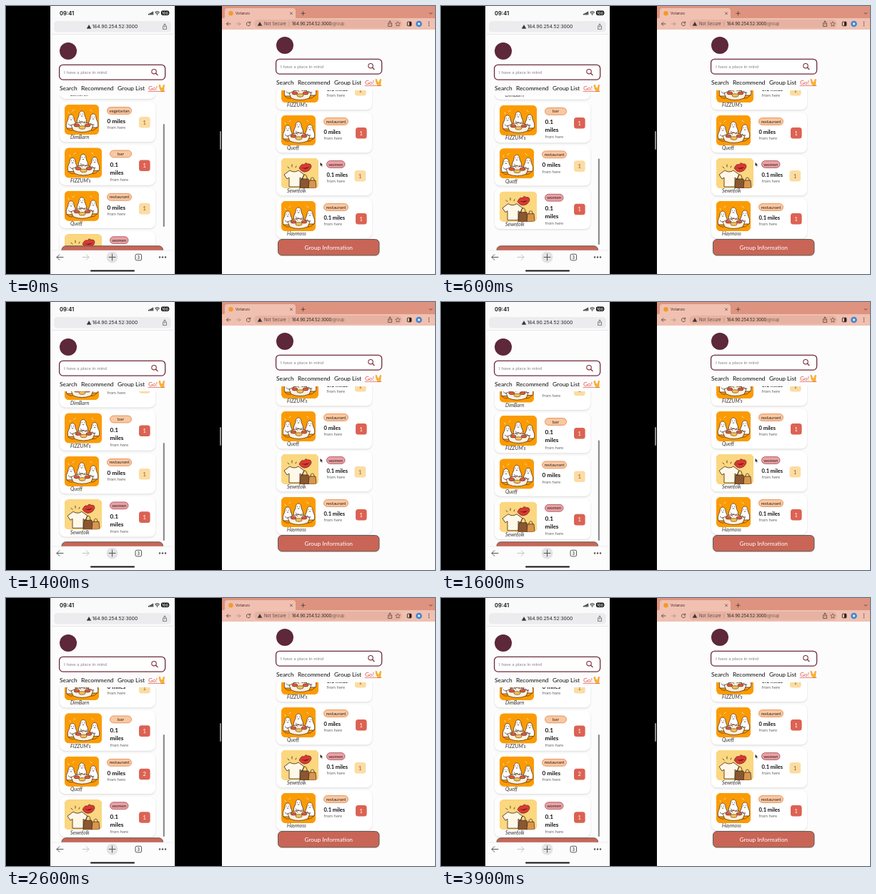
Recreate the animation shown at these times as an HTML page. Size 600 px wide and 375 px high, loop 4000 ms.

```html
<!DOCTYPE html>
<html lang="en">
<head>
<meta charset="utf-8">
<title>Group list</title>
<style>
  html, body { margin: 0; width: 100%; height: 100%; overflow: hidden; background: #000; }
  svg { display: block; }
  text { font-family: Lato, sans-serif; }
  .ui { font-family: Inter, sans-serif; }
  .line { fill: none; stroke-linecap: round; stroke-linejoin: round; }
  .card { filter: drop-shadow(0 1px 1px rgba(0, 0, 0, .14)); }
</style>
</head>
<body>
<svg id="stage" width="600" height="375" viewBox="0 0 600 375">
  <defs>
    <clipPath id="phoneList"><rect x="62" y="125" width="174" height="217"/></clipPath>
    <clipPath id="webList"><rect x="370" y="118" width="170" height="212"/></clipPath>
    <clipPath id="round48"><rect width="48" height="42" rx="6"/></clipPath>
    <clipPath id="round52"><rect width="52" height="42" rx="6"/></clipPath>

    <g id="friend" stroke="#3b1d10" stroke-width=".7">
      <path d="M-6 14C-8 7-5 5-4 1C-4-7 4-7 4 1C5 5 8 7 6 14Z" fill="#fff"/>
      <path class="line" d="M-1.6-1v.4M1.6-1v.4M-1 2q1 1 2 0M-4 8q2 3 5 2"/>
    </g>
    <g id="dinner">
      <rect width="54" height="42" fill="#fb9b04"/>
      <use href="#friend" x="24" y="14"/>
      <use href="#friend" x="9" y="19"/>
      <use href="#friend" x="40" y="18"/>
      <path d="M9 29q15-9 31 0l-3 7q-13 5-25 0Z" fill="#fff2df" stroke="#3b1d10" stroke-width=".7"/>
      <g stroke="#3b1d10" stroke-width=".6">
        <ellipse cx="17" cy="29" rx="4" ry="2" fill="#e8593c"/>
        <ellipse cx="32" cy="29" rx="4" ry="2" fill="#e8593c"/>
        <ellipse cx="24.500" cy="32" rx="4.500" ry="2.200" fill="#ffc34d"/>
        <path class="line" d="M3 33q3 4 8 3M37 36q5 1 8-4M20 24l3 3M29 23l-2 3"/>
      </g>
      <path class="line" d="M11 9l2-2M36 7l2 2M6 12l-1-2" stroke="#fff" stroke-width=".7"/>
    </g>
    <g id="shopping">
      <rect width="54" height="42" fill="#fbd780"/>
      <path d="M12 17l-8 6 4 6 3-2v13h15V27l3 2 3-6-8-6q-6 4-12 0Z" fill="#fff8e9" stroke="#3b2415" stroke-width=".8"/>
      <path d="M25 14q3-7 7-5q2-4 5-1q5-1 5 4q-2 6-8 7q-5 1-9-5Z" fill="#d93a33" stroke="#5b1c18" stroke-width=".6"/>
      <path d="M28 13q5 2 11-1q-4 5-11 1Z" fill="#42130f"/>
      <path d="M27 29h11l1 13H26Z" fill="#8a5731" stroke="#3b2415" stroke-width=".7"/>
      <path d="M39 31h9l1 11H38Z" fill="#d9964d" stroke="#3b2415" stroke-width=".7"/>
      <path class="line" d="M30 29q0-6 3-6t3 6M41 31q0-4 2.500-4t2.500 4M9 12l2 2M15 9v3M21 11l-1 2" stroke="#3b2415" stroke-width=".8"/>
    </g>
  </defs>
</svg>
<script>
const stage = document.getElementById('stage');

const text = (x, y, size, str, fill = '#111', extra = '') =>
  `<text x="${x}" y="${y + size * .35}" font-size="${size}" fill="${fill}" ${extra}>${str}</text>`;
const rect = (x, y, w, h, fill, rx = 0, extra = '') =>
  `<rect x="${x}" y="${y}" width="${w}" height="${h}" rx="${rx}" fill="${fill}" ${extra}/>`;
const circle = (x, y, r, fill, extra = '') =>
  `<circle cx="${x}" cy="${y}" r="${r}" fill="${fill}" ${extra}/>`;
const line = (d, color, width = 1) =>
  `<path class="line" d="${d}" stroke="${color}" stroke-width="${width}"/>`;
const group = (x, y, body, extra = '') =>
  `<g transform="translate(${x} ${y})" ${extra}>${body}</g>`;
const middle = 'text-anchor="middle"';
const ui = 'class="ui"';
const bold = 'font-weight="700"';

const warning = (x, y) =>
  `<path d="M${x} ${y - 2.5}l2.900 5h-5.800Z" fill="#333" stroke="#333" stroke-width=".4" stroke-linejoin="round"/>`;
const share = (x, y, color) =>
  line(`M${x - 1.2} ${y - 1}h-1.300v4.500h5v-4.500h-1.300M${x} ${y + 1}v-5m-1.400 1.400l1.400-1.400l1.400 1.400`, color, .7);

const victory = group(214, 110,
  `<g fill="#fdb72b" stroke="#e8901c" stroke-width=".4">
    <rect x="1" y="0" width="2" height="6.500" rx="1" transform="rotate(-14 2 6)"/>
    <rect x="4.500" y="0" width="2" height="6.500" rx="1" transform="rotate(16 5 6)"/>
    <path d="M1.500 5.500q3-2 5.500 0q1 4-2 4.500q-3 0-3.500-4.500Z"/>
  </g>`);

const header = circle(87, 63, 12, '#5d2839') +
  rect(74.6, 82.3, 148, 20.8, '#fff', 5, 'stroke="#6d2b3b" stroke-width="1.300"') +
  text(81, 93, 6.4, 'I have a place in mind', '#85808a') +
  circle(207, 91.7, 3.2, 'none', 'stroke="#7c2c3c" stroke-width="1.100"') +
  line('M209.500 94.200l2.600 2.500', '#7c2c3c', 1.2) +
  [[75, 'Search'], [105, 'Recommend'], [156, 'Group List']]
    .map(([x, s]) => text(x, 115, 8.35, s, '#0c0c0c')).join('') +
  text(199, 115, 8.35, 'Go!', '#dd5547') +
  victory + line('M199 119.500H222', '#dd5547', .7);

const tags = {
  plain: ['#f8c8a2', '#e78c50'],
  women: ['#e8a2a6', '#b4535d']
};

function badge(x, n, hot, id = '') {
  return `<g id="${id}">` + rect(x, 17, 15.6, 15.6, hot ? '#dc6253' : '#fcdca2', 3.5) +
    text(x + 7.8, 25, 7.5, n, hot ? '#fff' : '#85602c', middle) + '</g>';
}

// Coordinates inside a card start at the top left of its picture.
function card(x, y, o) {
  const wide = o.tag === 'bar' || o.tag === 'women';
  const left = wide ? 63.5 : 59.5;
  const tagW = o.tag === 'women' ? 25.5 : wide ? 30 : 34;
  const [fill, stroke] = tags[o.tag] || tags.plain;
  const w = wide ? 52 : 48;
  const art = o.tag === 'women' ? 'shopping' : 'dinner';
  const shift = wide && art === 'dinner' ? 2 : 0;
  const size = o.web ? 7.5 : 8.2;
  const dist = o.wrap
    ? text(left, 23.5, size, '0.1', '#111', bold) + text(left, 34.5, size, 'miles', '#111', bold)
    : text(left, 23, size, o.miles + ' miles', '#111', bold);
  return group(x, y,
    rect(-7, -4, 134, 56.3, '#fff', 8, 'class="card"') +
    `<g clip-path="url(#round${w})"><rect width="54" height="42" fill="#fb9b04"/><use href="#${art}" x="${shift}"/></g>` +
    text(8, 46, 7.1, o.name, '#333', 'font-style="italic"') +
    rect(left, 3.6, tagW, 9.8, fill, 4.9, `stroke="${stroke}" stroke-width=".9"`) +
    text(left + tagW / 2, 8.4, 6.2, o.tag, '#2d1d18', middle) +
    dist +
    text(left, o.wrap ? 44.5 : 32.3, 6, 'from here', '#666') +
    badge(o.badgeX || 104, 1, o.hot, o.id) );
}

const button = (x, y) =>
  rect(x, y, 141.5, 22.5, '#c86556', 5.5, 'stroke="#5f5c55" stroke-width="1"') +
  text(x + 70.7, y + 11.5, 8.3, 'Group Information', '#fff', middle);

const PITCH = 60.4;
const phoneCards = [
  { name: 'Lumbrell', tag: 'restaurant', miles: '0' },
  { name: 'DimBarn', tag: 'vegetarian', miles: '0' },
  { name: "FIZZUM's", tag: 'bar', wrap: true, hot: true },
  { name: 'Quoff', tag: 'restaurant', miles: '0', id: 'votes' },
  { name: 'Sewnfolk', tag: 'women', wrap: true, hot: true }
];
const webCards = [
  { name: "FIZZUM's", tag: 'bar', miles: '0.1', badgeX: 103 },
  { name: 'Quoff', tag: 'restaurant', miles: '0', hot: true },
  { name: 'Sewnfolk', tag: 'women', miles: '0.1', badgeX: 102.5 },
  { name: 'Haymoss', tag: 'restaurant', miles: '0.1', hot: true }
];

const phone = rect(62, 0, 174, 375, '#fdfcfd') +
  rect(62, 0, 174, 39.5, '#fafafb') +
  text(75, 10, 7.6, '09:41', '#111', ui + ' font-weight="600"') +
  [0, 1, 2, 3].map(i => rect(199 + i * 1.9, 10.8 - i, 1.3, 1.6 + i, '#111', .3)).join('') +
  line('M208.500 8.800q3-2.600 6 0M209.800 10.400q1.700-1.400 3.400 0', '#111', 1) +
  circle(211.5, 12, .7, '#111') +
  rect(217, 6.5, 11, 6.4, '#111', 1.8) + rect(228.4, 8.6, .8, 2.2, '#777', .4) +
  text(222.5, 9.8, 5, '100', '#fff', ui + ' font-weight="600" ' + middle) +
  rect(67, 21, 164, 15.6, '#ececef', 5) +
  warning(116, 29) + text(120.5, 29, 6.7, '164.90.254.52:3000', '#222', ui) +
  share(222, 29, '#555') +
  line('M62 39.500H236', '#dddddf', .6) +
  header +
  `<g clip-path="url(#phoneList)"><g id="list">` +
  phoneCards.map((o, i) => card(82, (i - 1) * PITCH, o)).join('') + '</g>' +
  button(78, 335.8) + '</g>' +
  '<rect id="thumb" x="219.800" width="2" rx="1" fill="#828284"/>' +
  rect(62, 342, 174, 33, '#fcfcfc') + line('M62 342H236', '#dcdcde', .5) +
  line('M80 351.500H71m3.800-3.800l-3.800 3.800l3.800 3.800', '#555', 1) +
  line('M107 351.500h9m-3.800-3.800l3.800 3.800l-3.800 3.800', '#c4c4c6', 1) +
  circle(148.5, 351.5, 8, '#e3e3e7') + line('M144 351.500h9M148.500 347v9', '#555', 1) +
  rect(181, 347.3, 8.6, 8.6, 'none', 1.8, 'stroke="#555" stroke-width="1"') +
  text(185.3, 351.7, 5.5, '3', '#444', ui + ' font-weight="600" ' + middle) +
  [215, 219, 223].map(x => circle(x, 351.5, 1.2, '#555')).join('') +
  rect(118, 369.4, 62, 2, '#111', 1);

const browser = rect(302, 0, 298, 375, '#fdfcfd') +
  rect(302, 0, 298, 18, '#dd937f') +
  '<path d="M303 18q3 0 3-3V7q0-4 4-4h91q4 0 4 4v8q0 3 3 3Z" fill="#f0c0b1"/>' +
  rect(302, 17, 298, 16, '#f0c0b1') +
  circle(314.5, 10.3, 3.2, '#f39a2b') +
  text(321, 10.3, 5.2, 'Votanzo', '#3a2a26', ui) +
  line('M397.500 8.800l3 3m0-3l-3 3', '#4a3833', .7) +
  line('M413 10.300h5M415.500 7.800v5', '#4a3833', .8) +
  line('M592 9.300l2 2l2-2', '#4a3833', .8) +
  line('M314 25h-5.500m2.400-2.400l-2.400 2.400l2.400 2.400', '#4a3833', .8) +
  line('M322.500 25h5.500m-2.400-2.400l2.400 2.400l-2.400 2.400', '#b08b80', .8) +
  line('M341.500 23.700a2.700 2.700 0 1 0 .2 2.200M341.700 22v1.900h-1.900', '#4a3833', .8) +
  rect(347, 19, 207, 12, '#e7b2a2', 6) +
  warning(355, 25) + text(361, 25, 5.8, 'Not Secure', '#5d4640', ui) +
  line('M396 22v6', '#b58b7f', .6) +
  text(400, 25, 5.8, '164.90.254.52:3000<tspan fill="#765b53">/group</tspan>', '#241a17', ui) +
  share(537, 25, '#4a3833') +
  '<path d="M548 21.800l1 2.100 2.300.300-1.700 1.600.4 2.300-2-1.100-2 1.100.4-2.300-1.700-1.600 2.300-.3Z" fill="none" stroke="#4a3833" stroke-width=".6"/>' +
  rect(561.3, 22.2, 5.6, 5.6, 'none', .8, 'stroke="#2d2320" stroke-width=".9"') +
  rect(564, 22.2, 2.9, 5.6, '#2d2320') +
  circle(577.5, 25, 4.3, '#4084cf') + circle(577.5, 25, 1.8, '#d8e7f5') +
  [22.5, 25, 27.5].map(y => circle(591.5, y, .7, '#4a3833')).join('') +
  group(303, -8, header) +
  `<g clip-path="url(#webList)">` +
  webCards.map((o, i) => card(385, 93 + i * 60, { ...o, web: true })).join('') + '</g>' +
  button(380.5, 326.5) +
  '<path d="M439.400 218.500v5.600l1.300-1.100.9 2 .9-.4-.9-1.900h1.700Z" fill="#111" stroke="#fff" stroke-width=".4"/>';

stage.insertAdjacentHTML('beforeend',
  phone + rect(299, 175, 2, 26, '#8c8c8c', 1) + browser);

const list = document.getElementById('list');
const thumb = document.getElementById('thumb');
const votes = document.getElementById('votes');
const [votesBox, votesText] = votes.children;

const LOOP = 4000, STEP = 100, REST = 101;
const swipe = [138, 116, 95, 81.5, 79];

// Swipe past the end, hold, then spring back to rest.
function scrollAt(n) {
  if (n < swipe.length) return swipe[n];
  if (n < 11) return 78.5;
  return REST - 22.5 * .64 ** (n - 11);
}

function draw(ms) {
  const n = Math.floor(ms % LOOP / STEP);
  const y = scrollAt(n);
  const top = y > REST ? 165 + (138 - y) * .7 : 191 + REST - y;
  list.setAttribute('transform', `translate(0 ${y.toFixed(2)})`);
  thumb.setAttribute('y', top);
  thumb.setAttribute('height', Math.min(334, top + 144) - top);
  const voted = n >= 26;
  votesBox.setAttribute('fill', voted ? '#dc6253' : '#fcdca2');
  votesText.setAttribute('fill', voted ? '#fff' : '#85602c');
  votesText.textContent = voted ? 2 : 1;
}

const start = performance.now();
function tick() {
  draw(performance.now() - start);
  requestAnimationFrame(tick);
}
tick();
</script>
</body>
</html>
```
